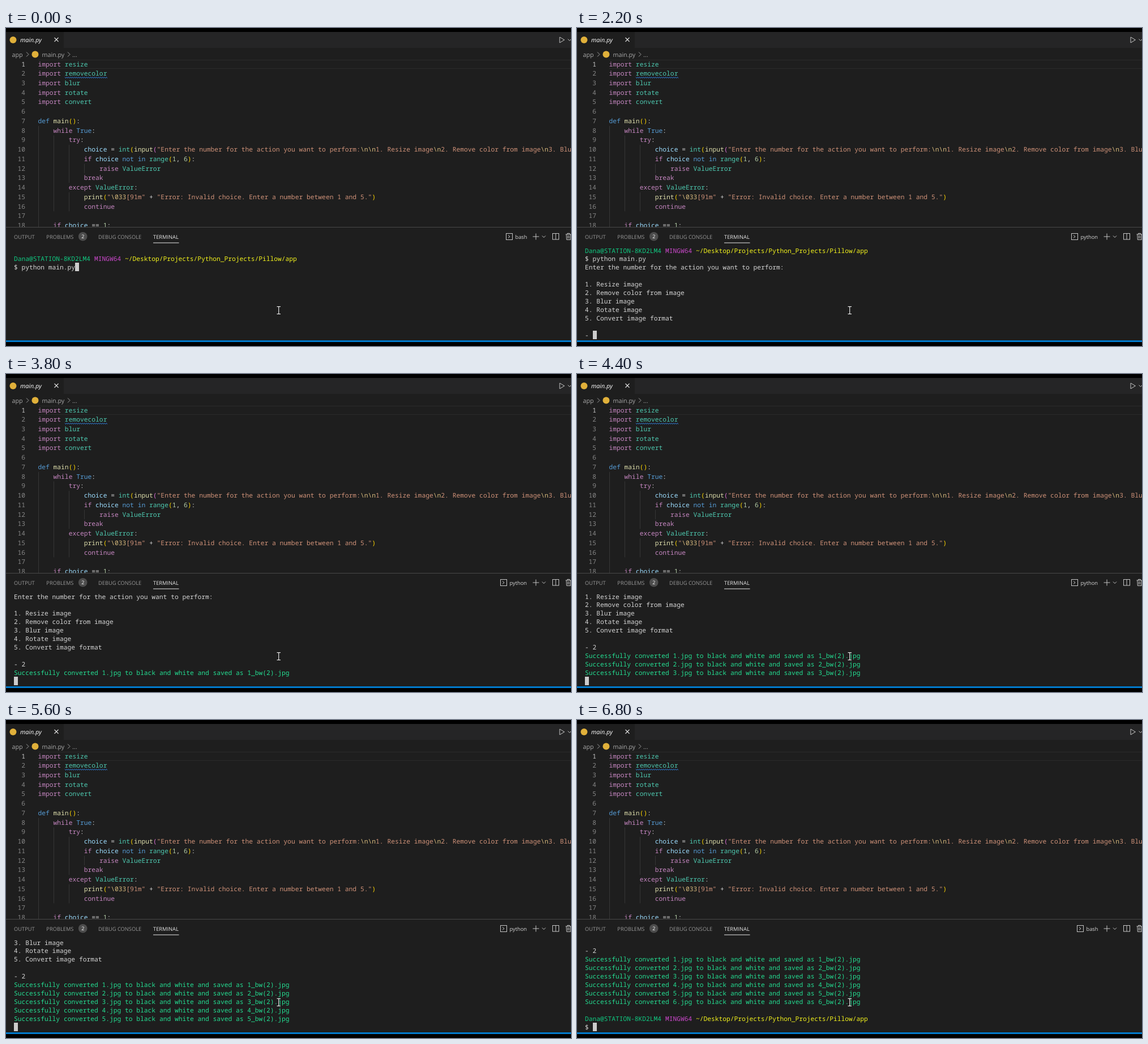
Write an HTML page with a canvas that moves like this. It is 998 by 561 pixels and loops after 7 s.

```html
<!DOCTYPE html>
<html lang="en">
<head>
<meta charset="utf-8">
<title>Image tool in a terminal</title>
<style>
html, body { margin: 0; width: 100%; height: 100%; overflow: hidden; background: #000; }
canvas { display: block; }
</style>
</head>
<body>
<canvas id="stage" width="998" height="561"></canvas>
<script>
const ctx = document.getElementById('stage').getContext('2d');
const LOOP = 7000;
const MONO = '"Noto Sans Mono", "DejaVu Sans Mono", monospace';
const SANS = '"Open Sans", "Noto Sans", sans-serif';
const BG = '#1e1e1e', ICON = '#c5c5c5', FG = '#d4d4d4';

// Editor
const CODE = { x: 56.4, y: 67.5, adv: 6.78, pitch: 16.74 };
const source = String.raw`import resize
import removecolor
import blur
import rotate
import convert

def main():
    while True:
        try:
            choice = int(input("Enter the number for the action you want to perform:\n\n1. Resize image\n2. Remove color from image\n3. Blur
            if choice not in range(1, 6):
                raise ValueError
            break
        except ValueError:
            print("\033[91m" + "Error: Invalid choice. Enter a number between 1 and 5.")
            continue

    if choice == 1:`.split('\n');

const wordColor = {};
const paint = (color, words) => words.split(' ').forEach(w => wordColor[w] = color);
paint('#c586c0', 'import while try if raise break except continue');
paint('#569cd6', 'def True not in');
paint('#4ec9b0', 'resize removecolor blur rotate convert int range ValueError');
paint('#dcdcaa', 'main input print');
paint('#9cdcfe', 'choice');
const brackets = ['#ffd700', '#da70d6', '#179fff'];

// Terminal
const TERM = { x: 14, y: 546, adv: 6.76, pitch: 14.95, rows: 11 };
const prompt = [
  ['#10c880', 'Dana@STATION-8KD2LM4 '],
  ['#cc48cc', 'MINGW64 '],
  ['#f2f21c', '~/Desktop/Projects/Python_Projects/Pillow/app']
];
const plain = s => [[FG, s]];
const saved = n => [['#24de92',
  `Successfully converted ${n}.jpg to black and white and saved as ${n}_bw(2).jpg`]];
const ANSWER = 11, ANSWERED = 3400;
const log = [
  plain(''), prompt, plain('$ python main.py'),
  plain('Enter the number for the action you want to perform:'), plain(''),
  ...['Resize image', 'Remove color from image', 'Blur image', 'Rotate image', 'Convert image format']
    .map((s, i) => plain(`${i + 1}. ${s}`)),
  plain(''), plain('- 2'),
  ...[1, 2, 3, 4, 5, 6].map(saved),
  plain(''), prompt, plain('$ ')
];
const logLine = (i, time) => i === ANSWER && time < ANSWERED ? plain('- ') : log[i];

// at: start time, top: first visible line, last: last printed line, col: cursor column
const steps = [
  { at: 0, top: 0, last: 2, col: 16, row: 2 },
  { at: 600, top: 0, last: 2, col: -1 },
  { at: 1200, top: 0, last: 9, col: 0 },
  { at: 1400, top: 1, last: 11, col: 2 },
  { at: ANSWERED, top: 1, last: 11, col: 3 },
  { at: 3600, top: 1, last: 11, col: 0 },
  { at: 3800, top: 3, last: 12, col: 0 },
  { at: 4200, top: 4, last: 14, col: 0 },
  { at: 4400, top: 5, last: 14, col: 0 },
  { at: 4800, top: 5, last: 15, col: 0 },
  { at: 5000, top: 6, last: 15, col: 0 },
  { at: 5400, top: 7, last: 16, col: 0 },
  { at: 5800, top: 10, last: 20, col: 2 }
];

function rect(x, y, w, h, color) {
  ctx.fillStyle = color;
  ctx.fillRect(x, y, w, h);
}

function disc(x, y, r, color) {
  ctx.fillStyle = color;
  ctx.beginPath();
  ctx.arc(x, y, r, 0, Math.PI * 2);
  ctx.fill();
}

function line(points, color = ICON, width = 1, close = false) {
  ctx.strokeStyle = color;
  ctx.lineWidth = width;
  ctx.beginPath();
  points.forEach(([x, y]) => ctx.lineTo(x, y));
  if (close) ctx.closePath();
  ctx.stroke();
}

function box(x, y, w, h) {
  ctx.strokeStyle = ICON;
  ctx.lineWidth = 1;
  ctx.strokeRect(x, y, w, h);
}

function label(s, x, y, size, color, style = '', align = 'left') {
  ctx.font = `${style} ${size}px ${SANS}`;
  ctx.textAlign = align;
  ctx.fillStyle = color;
  ctx.fillText(s, x, y);
  ctx.textAlign = 'left';
}

const chevronRight = (x, y) => line([[x - 2, y - 4], [x + 2, y], [x - 2, y + 4]], '#a0a0a0');
const chevronDown = (x, y) => line([[x - 3, y - 1.5], [x, y + 1.5], [x + 3, y - 1.5]]);

function monoFont(grid) {
  ctx.font = `${grid.adv / 0.6}px ${MONO}`;
}

// Places each word on the character grid
function gridText(s, col, y, grid, color) {
  ctx.fillStyle = color;
  for (const m of s.matchAll(/\S+/g))
    ctx.fillText(m[0], grid.x + (col + m.index) * grid.adv, y);
}

function codeLine(s, y) {
  let quoted = false, depth = 0;
  for (const m of s.matchAll(/"|\\n|\\033|\w+|\s+|./g)) {
    const t = m[0];
    let color = wordColor[t] || '#d4d4d4';
    if (t === '"' || quoted) {
      color = t[0] === '\\' ? '#d7ba7d' : '#ce9178';
      if (t === '"') quoted = !quoted;
    } else if (t === '(') color = brackets[depth++];
    else if (t === ')') color = brackets[--depth];
    else if (/^\d/.test(t)) color = '#b5cea8';
    gridText(t, m.index, y, CODE, color);
  }
}

function guide(col, from, to) {
  const top = CODE.y - 12 + (from - 1) * CODE.pitch;
  rect(Math.round(57 + col * CODE.adv), top, 1, (to - from + 1) * CODE.pitch, '#363636');
}

function squiggle(x0, x1, y) {
  const points = [];
  for (let x = x0; x <= x1; x += 0.5) points.push([x, y + Math.sin(x * 1.8) * 0.9]);
  line(points, '#3794ff', 0.9);
}

function drawEditor() {
  ctx.save();
  ctx.beginPath();
  ctx.rect(0, 7, 998, 344);
  ctx.clip();
  rect(0, 7, 998, 344, BG);
  rect(102, 7, 896, 28, '#252526');

  disc(12.5, 21, 6, '#e0b03a');
  label('main.py', 25, 25, 10.7, '#ffffff', 'italic');
  line([[85.5, 17], [92.5, 24]], '#e0e0e0', 1.1);
  line([[92.5, 17], [85.5, 24]], '#e0e0e0', 1.1);
  line([[978, 16], [986.3, 21], [978, 26]], ICON, 1, true);
  chevronDown(995.5, 21);

  label('app', 10.5, 50.5, 10.7, '#a9a9a9');
  chevronRight(38, 46.5);
  disc(51.5, 46.5, 6, '#e0b03a');
  label('main.py', 63.5, 50.5, 10.7, '#a9a9a9');
  chevronRight(111, 46.5);
  label('...', 117, 50.5, 10.7, '#a9a9a9');

  rect(57, 56, 941, 1, '#2b2b2b');
  rect(57, 71, 941, 1, '#2b2b2b');
  guide(0, 8, 18);
  guide(4, 9, 16);
  guide(8, 10, 13);
  guide(8, 15, 16);
  guide(12, 12, 12);

  monoFont(CODE);
  source.forEach((s, i) => {
    const y = CODE.y + i * CODE.pitch;
    const n = String(i + 1);
    ctx.fillStyle = i ? '#858585' : '#c6c6c6';
    ctx.fillText(n, 34 - n.length * CODE.adv, y);
    codeLine(s, y);
  });
  squiggle(104, 179, 87.5);
  ctx.restore();
}

function drawPanel(shell) {
  rect(0, 351, 998, 200, BG);
  rect(0, 351, 998, 1, '#484848');
  const dim = '#989898';
  label('OUTPUT', 14, 371.5, 9.3, dim);
  label('PROBLEMS', 71.3, 371.5, 9.3, dim);
  disc(135.7, 367.7, 7.8, '#4d4d4d');
  label('2', 135.7, 371, 9, '#ffffff', '', 'center');
  label('DEBUG CONSOLE', 163, 371.5, 9.3, dim);
  label('TERMINAL', 260, 371.5, 9.3, '#e7e7e7');
  rect(260, 378.5, 45.5, 1, '#e7e7e7');

  const x = shell === 'bash' ? 883.5 : 873.5;
  box(x, 362.5, 11, 11);
  line([[x + 3.5, 365.5], [x + 6.5, 368], [x + 3.5, 370.5]]);
  label(shell, x + 16, 371.7, 9.3, FG);
  line([[930.5, 368], [941.5, 368]]);
  line([[936, 362.5], [936, 373.5]]);
  chevronDown(950, 368);
  box(965.5, 362.5, 11, 10.5);
  line([[971, 362.5], [971, 373]]);
  line([[988.5, 364], [998, 364]]);
  line([[991.5, 364], [991.5, 362.3], [995.5, 362.3], [995.5, 364]]);
  line([[989.8, 364], [990.3, 373.5], [997, 373.5], [997.5, 364]]);
  line([[992.3, 366], [992.3, 371.5]]);
  line([[994.7, 366], [994.7, 371.5]]);
}

function drawTerminal(step, time) {
  const bottom = TERM.rows - 1;
  const baseline = row => TERM.y - (bottom - row) * TERM.pitch;
  monoFont(TERM);
  for (let i = step.top; i <= step.last; i++) {
    let col = 0;
    for (const [color, text] of logLine(i, time)) {
      gridText(text, col, baseline(i - step.top), TERM, color);
      col += text.length;
    }
  }
  if (step.col < 0) return;
  const row = step.row ?? bottom;
  const y = baseline(row);
  rect(Math.round(TERM.x + step.col * TERM.adv), Math.round(y - 12), 7, 15, '#cccccc');
  const i = step.top + row;
  if (i <= step.last) {
    const under = logLine(i, time).map(part => part[1]).join('')[step.col] || '';
    gridText(under, step.col, y, TERM, BG);
  }
}

function drawPointer() {
  const shape = [[[478.5, 491.5], [485, 491.5]], [[481.7, 491.5], [481.7, 504.5]], [[478.5, 504.5], [485, 504.5]]];
  shape.forEach(p => line(p, '#101010', 2.6));
  shape.forEach(p => line(p, '#f0f0f0', 1.2));
}

function draw(time) {
  ctx.textRendering = 'geometricPrecision';
  rect(0, 0, 998, 561, '#000000');
  drawEditor();
  drawPanel(time >= 2200 && time < 6800 ? 'python' : 'bash');
  drawTerminal(steps.filter(s => s.at <= time).pop(), time);
  drawPointer();
  rect(0, 551, 998, 3, '#007acc');
}

const start = performance.now();
function tick() {
  draw((performance.now() - start) % LOOP);
  requestAnimationFrame(tick);
}
tick();
</script>
</body>
</html>
```
